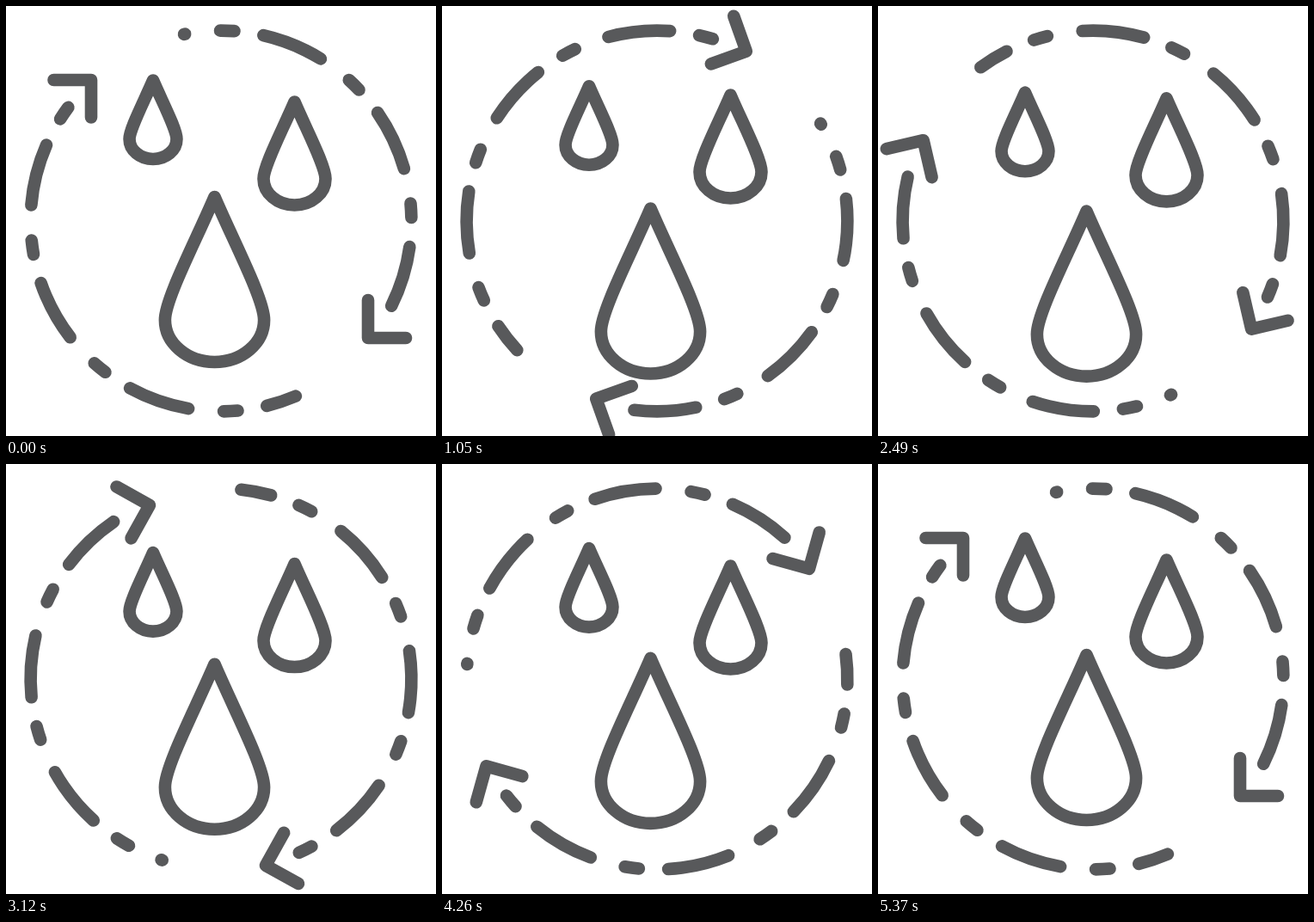
Recreate the animation shown at these times as an HTML page with a canvas. Size 500 by 500 pixels, loop 5.4 s.

```html
<!DOCTYPE html>
<html>
<head>
<meta charset="utf-8">
<style>
  html, body { margin: 0; width: 100%; height: 100%; overflow: hidden; background: #fff; }
  canvas { display: block; }
</style>
</head>
<body>
<canvas id="stage" width="500" height="500"></canvas>
<script>
const ctx = document.getElementById('stage').getContext('2d');
const LOOP = 5400, STEP = 30, LAST = LOOP - STEP;
const R = 221.4, RAD = Math.PI / 180;
const DASHES = [18.7, 8.85, 4.25, 10.65].map(deg => deg * RAD * R);
const KEY_TIMES = [0, 1800, 3600, LAST];

// x, apex y, height, vertical shift at each key time
const DROPS = [
  [171, 86.5, 91.5, [0, 11.5, 18.5, 0]],
  [335.5, 111.5, 120, [0, -13.7, 11.2, 0]],
  [242.5, 222, 192, [0, 23.1, 6.2, 0]]
];

function tween(values, t) {
  let i = 0;
  while (i < 2 && t > KEY_TIMES[i + 1]) i++;
  const p = (t - KEY_TIMES[i]) / (KEY_TIMES[i + 1] - KEY_TIMES[i]);
  return values[i] + (values[i + 1] - values[i]) * p;
}

function drawDrop(x, y, h) {
  const w = h * 0.3, side = y + h * 0.745, ry = h * 0.255;
  ctx.beginPath();
  ctx.moveTo(x, y);
  ctx.bezierCurveTo(x + w * 0.4, y + h * 0.28, x + w, y + h * 0.62, x + w, side);
  ctx.ellipse(x, side, w, ry, 0, 0, Math.PI);
  ctx.bezierCurveTo(x - w, y + h * 0.62, x - w * 0.4, y + h * 0.28, x, y);
  ctx.closePath();
  ctx.stroke();
}

function drawArc(from, to, skipped, reverse) {
  ctx.setLineDash(DASHES);
  ctx.lineDashOffset = skipped * RAD * R;
  ctx.beginPath();
  ctx.arc(0, 0, R, from * RAD, to * RAD, reverse);
  ctx.stroke();
  ctx.setLineDash([]);
}

function drawHead(x, y, size) {
  ctx.beginPath();
  ctx.moveTo(x, y - size);
  ctx.lineTo(x, y);
  ctx.lineTo(x + size, y);
  ctx.stroke();
}

function draw(t) {
  ctx.fillStyle = '#fff';
  ctx.fillRect(0, 0, 500, 500);
  ctx.strokeStyle = '#58595b';
  ctx.lineWidth = 14.6;
  ctx.lineCap = ctx.lineJoin = 'round';

  for (const [x, y, h, shifts] of DROPS) drawDrop(x, y + tween(shifts, t), h);

  ctx.save();
  ctx.translate(250, 250);
  ctx.rotate(2 * Math.PI * t / LAST);
  drawArc(26.5, -101.2, 0, true);
  drawHead(171, 136, 44);
  drawArc(66.9, 217, 9.5, false);
  drawHead(-151, -164, -43.5);
  ctx.restore();
}

const start = performance.now();
function tick() {
  const t = (performance.now() - start) % LOOP;
  draw(Math.floor(t / STEP) * STEP);
  requestAnimationFrame(tick);
}
tick();
</script>
</body>
</html>
```
